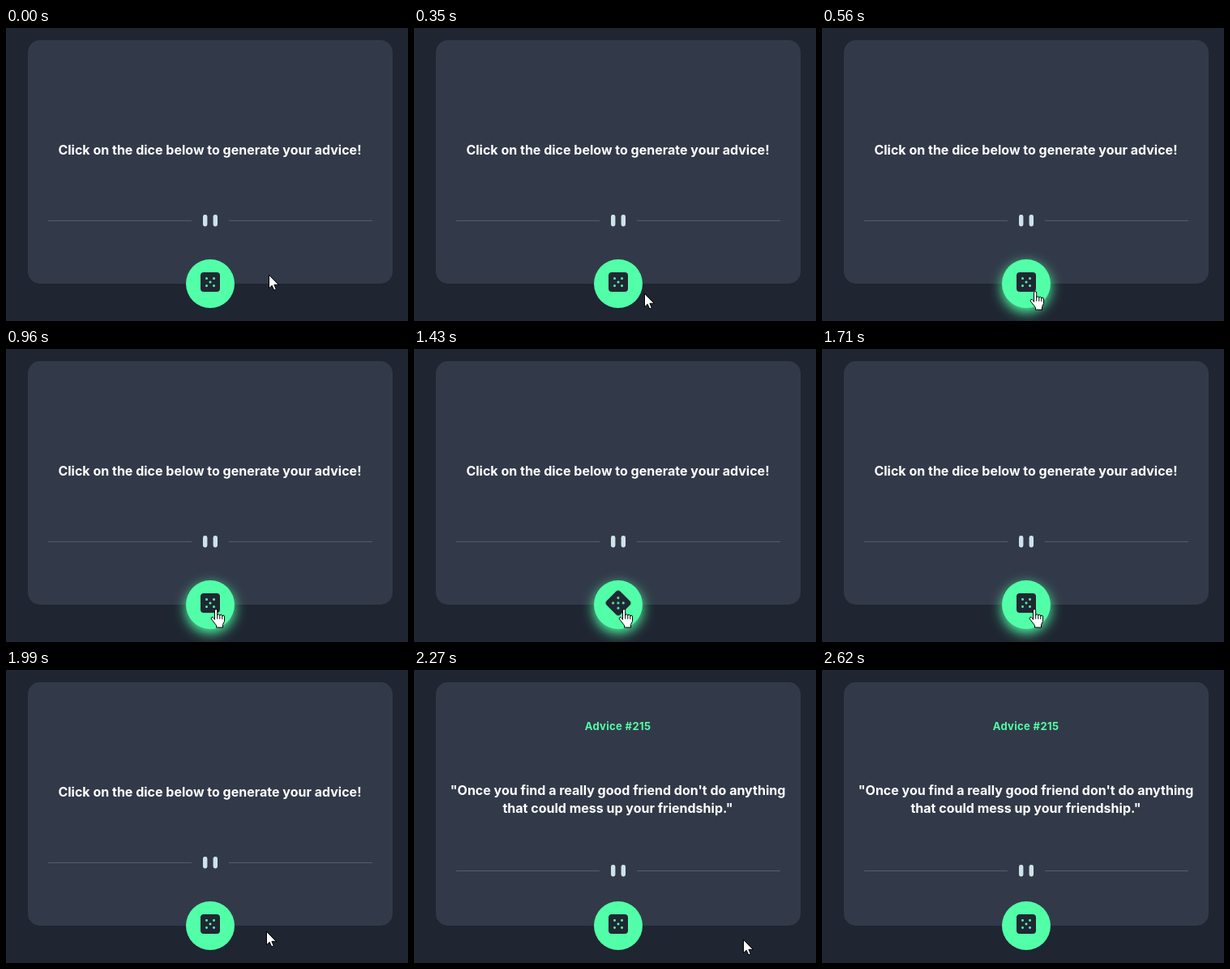
Animation of 496x361 px, one loop 2.69 s. Source, as an HTML page:

```html
<!DOCTYPE html>
<html lang="en">
<head>
<meta charset="utf-8">
<title>Advice generator</title>
<style>
  html, body { margin: 0; width: 100%; height: 100%; overflow: hidden; background: #1f2632; }
  svg { display: block; }
  text { font: 700 16px Inter, "Open Sans", sans-serif; fill: #fff; text-anchor: middle; }
  #number { font-size: 13px; letter-spacing: .35px; fill: #52ffa8; }
  .glow { filter: drop-shadow(0 5px 7.5px #52ffa8); }
  #die { transform-box: fill-box; transform-origin: center; }
  .cursor { fill: #fff; stroke: #000; stroke-linejoin: round; stroke-linecap: round; }
</style>
</head>
<body>
<svg width="496" height="361">
  <rect x="27" y="15" width="450" height="300" rx="15" fill="#323a49"/>

  <text id="prompt" x="251.5" y="156">Click on the dice below to generate your advice!</text>
  <g id="advice">
    <text id="number" x="251.5" y="74">Advice #215</text>
    <text x="251.5" y="154">"Once you find a really good friend don't do anything</text>
    <text x="251.5" y="176">that could mess up your friendship."</text>
  </g>

  <g id="divider">
    <path d="M52 237.5H229M275 237.5H452" stroke="#4f5d74"/>
    <g fill="#cee3e9">
      <rect x="243" y="230" width="5.4" height="14.4" rx="2.4"/>
      <rect x="255.6" y="230" width="5.4" height="14.4" rx="2.4"/>
    </g>
  </g>

  <circle id="button" cx="252" cy="315" r="30" fill="#52ffa8"/>
  <g id="die">
    <rect x="240" y="301" width="24" height="24" rx="4" fill="#202733"/>
    <g fill="#52ffa8">
      <circle cx="247.5" cy="308.5" r="1.5"/>
      <circle cx="256.5" cy="308.5" r="1.5"/>
      <circle cx="252" cy="313" r="1.5"/>
      <circle cx="247.5" cy="317.5" r="1.5"/>
      <circle cx="256.5" cy="317.5" r="1.5"/>
    </g>
  </g>

  <path id="arrow" class="cursor" d="M.5 .5V16.8L4.2 13.3 6.7 19 9.3 17.9 6.9 12.3H12Z"/>
  <g id="hand" class="cursor">
    <path d="M5.5 13V2.2a1.6 1.6 0 0 1 3.2 0V8.2q.1-1.4 1.5-1.4 1.6 0 1.6 1.8 .2-1.2 1.4-1.2
      1.6 0 1.6 1.8 .1-1 1.2-1 1.5 0 1.5 1.8v5.5l-2 4.2v3.4h-8v-2.6L2 13.5q-1.6-2.2-.2-3 1.4-.6 2.4 .8z"/>
    <path d="M8.7 8.2v4M11.8 8.8v3.6M14.8 9.4v3.2"/>
  </g>
</svg>
<script>
const LOOP = 2690, STEP = 70;
const ENTER = 490, LEAVE = 1850, REVEAL = 2270;
const ROLL_START = 1205, ROLL_TIME = 500;

// Pointer hot spot: time, x, y
const path = [
  [0, 324, 304], [420, 276, 331], [560, 262, 324], [630, 262, 324], [900, 258, 320],
  [1570, 258, 320], [1710, 261, 320], [1780, 277, 321], [1850, 299, 322], [2130, 343, 322],
  [2270, 406, 332], [2340, 425, 338], [2550, 454, 358], [2620, 470, 372], [LOOP, 470, 372]
];

const $ = id => document.getElementById(id);
const show = (id, on) => $(id).setAttribute('visibility', on ? 'visible' : 'hidden');
const move = (id, x, y) => $(id).setAttribute('transform', `translate(${x} ${y})`);

const roll = $('die').animate(
  { transform: ['rotate(0deg)', 'rotate(180deg)'] },
  { duration: ROLL_TIME, easing: 'ease', fill: 'both' }
);
roll.pause();

// The picture advances in steps, restarting after each pause.
function snap(t) {
  const origin = t < 690 ? 0 : t < 1220 ? 690 : 1220;
  return origin + Math.floor((t - origin) / STEP) * STEP;
}

function pointerAt(t) {
  const i = path.findIndex(p => p[0] > t);
  const [t0, x0, y0] = path[i - 1], [t1, x1, y1] = path[i];
  const u = (t - t0) / (t1 - t0);
  return [Math.round(x0 + (x1 - x0) * u), Math.round(y0 + (y1 - y0) * u)];
}

function draw(time) {
  const t = snap(time % LOOP);
  const hover = t >= ENTER && t < LEAVE;
  const revealed = t >= REVEAL;
  const [x, y] = pointerAt(t);

  show('arrow', !hover);
  show('hand', hover);
  move('arrow', x, y);
  move('hand', x - 6, y);
  $('button').classList.toggle('glow', hover);
  roll.currentTime = Math.min(Math.max(t - ROLL_START, 0), ROLL_TIME);

  show('prompt', !revealed);
  show('advice', revealed);
  move('divider', 0, revealed ? 10 : 0);
}

const start = performance.now();
function tick() {
  draw(performance.now() - start);
  requestAnimationFrame(tick);
}
tick();
</script>
</body>
</html>
```
